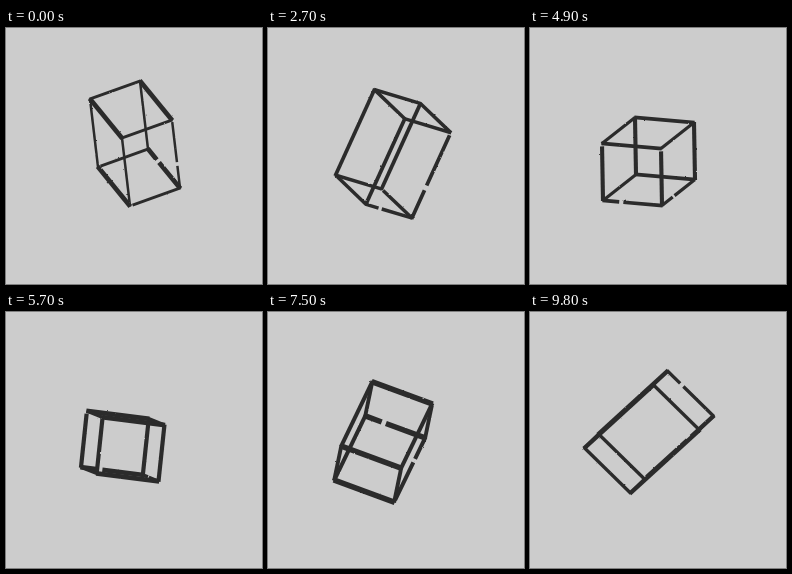
An HTML page without scripts that plays this animation: 256 px wide and 256 px high, repeating every 10000 ms.

```html
<!DOCTYPE html>
<html lang="en">
<head>
<meta charset="utf-8">
<title>Tumbling box</title>
<style>
@property --k { syntax: "<number>"; inherits: true; initial-value: 0 }
@property --w0 { syntax: "<number>"; inherits: true; initial-value: 0 }
@property --w1 { syntax: "<number>"; inherits: true; initial-value: 0 }
@property --w2 { syntax: "<number>"; inherits: true; initial-value: 0 }
@property --w3 { syntax: "<number>"; inherits: true; initial-value: 0 }
@property --w4 { syntax: "<number>"; inherits: true; initial-value: 0 }
@property --w5 { syntax: "<number>"; inherits: true; initial-value: 0 }
@property --w6 { syntax: "<number>"; inherits: true; initial-value: 0 }
@property --w7 { syntax: "<number>"; inherits: true; initial-value: 0 }
@property --w8 { syntax: "<number>"; inherits: true; initial-value: 0 }
@property --ax { syntax: "<number>"; inherits: true; initial-value: 0 }
@property --ay { syntax: "<number>"; inherits: true; initial-value: 0 }
@property --bx { syntax: "<number>"; inherits: true; initial-value: 0 }
@property --by { syntax: "<number>"; inherits: true; initial-value: 0 }
@property --cx { syntax: "<number>"; inherits: true; initial-value: 0 }
@property --cy { syntax: "<number>"; inherits: true; initial-value: 0 }
@property --mx { syntax: "<number>"; inherits: true; initial-value: 0 }
@property --my { syntax: "<number>"; inherits: true; initial-value: 0 }
@property --la { syntax: "<number>"; inherits: true; initial-value: 0 }
@property --lb { syntax: "<number>"; inherits: true; initial-value: 0 }
@property --lc { syntax: "<number>"; inherits: true; initial-value: 0 }

html, body { margin: 0; width: 100%; height: 100%; overflow: hidden; background: #ccc }
html { animation: tick 10s -5ms infinite }

/* step counter: runs of ten steps with a short hold after each */
@keyframes tick {
  0% { --k: 0; animation-timing-function: steps(10) }
  10% { --k: 10; animation-timing-function: step-end }
  12% { --k: 11; animation-timing-function: steps(9) }
  21% { --k: 20; animation-timing-function: step-end }
  23% { --k: 21; animation-timing-function: steps(9) }
  32% { --k: 30; animation-timing-function: step-end }
  34% { --k: 31; animation-timing-function: steps(9) }
  43% { --k: 40; animation-timing-function: step-end }
  45% { --k: 41; animation-timing-function: steps(9) }
  54% { --k: 50; animation-timing-function: step-end }
  56% { --k: 51; animation-timing-function: steps(9) }
  65% { --k: 60; animation-timing-function: step-end }
  67% { --k: 61; animation-timing-function: steps(9) }
  76% { --k: 70; animation-timing-function: step-end }
  78% { --k: 71; animation-timing-function: steps(9) }
  87% { --k: 80; animation-timing-function: step-end }
  89% { --k: 81; animation-timing-function: steps(9) }
  98%, 100% { --k: 90; animation-timing-function: step-end }
}

/* Catmull-Rom weights of nine evenly spaced poses */
svg {
  display: block; width: 100%; height: 100%;
  --u: (var(--k) / 15 + 1);
  --m0: max(var(--u), 0 - var(--u));
  --m1: max(var(--u) - 1, 1 - var(--u));
  --m2: max(var(--u) - 2, 2 - var(--u));
  --m3: max(var(--u) - 3, 3 - var(--u));
  --m4: max(var(--u) - 4, 4 - var(--u));
  --m5: max(var(--u) - 5, 5 - var(--u));
  --m6: max(var(--u) - 6, 6 - var(--u));
  --m7: max(var(--u) - 7, 7 - var(--u));
  --m8: max(var(--u) - 8, 8 - var(--u));
  --w0: calc(pow(max(0, 2 - var(--m0)), 2) * (1 - var(--m0)) / 2 + pow(max(0, 1 - var(--m0)), 2) * (2 * var(--m0) - 1));
  --w1: calc(pow(max(0, 2 - var(--m1)), 2) * (1 - var(--m1)) / 2 + pow(max(0, 1 - var(--m1)), 2) * (2 * var(--m1) - 1));
  --w2: calc(pow(max(0, 2 - var(--m2)), 2) * (1 - var(--m2)) / 2 + pow(max(0, 1 - var(--m2)), 2) * (2 * var(--m2) - 1));
  --w3: calc(pow(max(0, 2 - var(--m3)), 2) * (1 - var(--m3)) / 2 + pow(max(0, 1 - var(--m3)), 2) * (2 * var(--m3) - 1));
  --w4: calc(pow(max(0, 2 - var(--m4)), 2) * (1 - var(--m4)) / 2 + pow(max(0, 1 - var(--m4)), 2) * (2 * var(--m4) - 1));
  --w5: calc(pow(max(0, 2 - var(--m5)), 2) * (1 - var(--m5)) / 2 + pow(max(0, 1 - var(--m5)), 2) * (2 * var(--m5) - 1));
  --w6: calc(pow(max(0, 2 - var(--m6)), 2) * (1 - var(--m6)) / 2 + pow(max(0, 1 - var(--m6)), 2) * (2 * var(--m6) - 1));
  --w7: calc(pow(max(0, 2 - var(--m7)), 2) * (1 - var(--m7)) / 2 + pow(max(0, 1 - var(--m7)), 2) * (2 * var(--m7) - 1));
  --w8: calc(pow(max(0, 2 - var(--m8)), 2) * (1 - var(--m8)) / 2 + pow(max(0, 1 - var(--m8)), 2) * (2 * var(--m8) - 1));
}

/* edge vectors a, b, c, centre m and line weights l */
.box {
  --ax: calc(52 * var(--w0) + 50 * var(--w1) + 44 * var(--w2) + 22.6 * var(--w3) + 1 * var(--w4) - 10 * var(--w5) - 2.5 * var(--w6) + 14 * var(--w7) + 27 * var(--w8));
  --ay: calc(-40 * var(--w0) - 18 * var(--w1) + 7 * var(--w2) + 39 * var(--w3) + 57 * var(--w4) + 49 * var(--w5) + 21.6 * var(--w6) - 14 * var(--w7) - 45 * var(--w8));
  --bx: calc(25 * var(--w0) + 32 * var(--w1) + 39 * var(--w2) + 49.6 * var(--w3) + 59 * var(--w4) + 63 * var(--w5) + 56.5 * var(--w6) + 46 * var(--w7) + 33 * var(--w8));
  --by: calc(52 * var(--w0) + 39 * var(--w1) + 24 * var(--w2) + 9.8 * var(--w3) + 5 * var(--w4) + 13.7 * var(--w5) + 28.3 * var(--w6) + 45 * var(--w7) + 60 * var(--w8));
  --cx: calc(42 * var(--w0) + 8 * var(--w1) - 23 * var(--w2) - 42.9 * var(--w3) - 33 * var(--w4) + 8 * var(--w5) + 44.5 * var(--w6) + 69 * var(--w7) + 85 * var(--w8));
  --cy: calc(30 * var(--w0) + 68 * var(--w1) + 91 * var(--w2) + 76.6 * var(--w3) + 26 * var(--w4) - 41 * var(--w5) - 72 * var(--w6) - 63 * var(--w7) - 45 * var(--w8));
  --mx: calc(130 * var(--w0) + 129 * var(--w1) + 127.5 * var(--w2) + 123.7 * var(--w3) + 118.5 * var(--w4) + 115.4 * var(--w5) + 115.7 * var(--w6) + 119 * var(--w7) + 124 * var(--w8));
  --my: calc(110.5 * var(--w0) + 115.5 * var(--w1) + 120.5 * var(--w2) + 128.4 * var(--w3) + 133.5 * var(--w4) + 133.3 * var(--w5) + 127.2 * var(--w6) + 120 * var(--w7) + 112 * var(--w8));
  --la: calc(3 * var(--w0) + 2.9 * var(--w1) + 2.4 * var(--w2) + 4 * var(--w3) + 4.1 * var(--w4) + 4.2 * var(--w5) + 3.6 * var(--w6) + 3 * var(--w7) + 3 * var(--w8));
  --lb: calc(5 * var(--w0) + 4.7 * var(--w1) + 4.3 * var(--w2) + 3.2 * var(--w3) + 3.7 * var(--w4) + 5.8 * var(--w5) + 5 * var(--w6) + 3.3 * var(--w7) + 3 * var(--w8));
  --lc: calc(2 * var(--w0) + 2.5 * var(--w1) + 3.6 * var(--w2) + 3.7 * var(--w3) + 3.2 * var(--w4) + 4 * var(--w5) + 4 * var(--w6) + 4.2 * var(--w7) + 4 * var(--w8));
  fill: none; stroke: #2b2b2b;
}
.a { --dx: var(--ax); --dy: var(--ay); --px: var(--bx); --py: var(--by); --qx: var(--cx); --qy: var(--cy); --l: var(--la) }
.b { --dx: var(--bx); --dy: var(--by); --px: var(--ax); --py: var(--ay); --qx: var(--cx); --qy: var(--cy); --l: var(--lb) }
.c { --dx: var(--cx); --dy: var(--cy); --px: var(--ax); --py: var(--ay); --qx: var(--bx); --qy: var(--by); --l: var(--lc) }

/* a unit line laid along d, shifted by half of p and q */
path {
  vector-effect: non-scaling-stroke;
  stroke-width: calc(var(--l) * 1px);
  transform: matrix(var(--dx), var(--dy), calc(-1 * var(--dy)), var(--dx),
    calc(var(--mx) + (var(--i) * var(--px) + var(--j) * var(--qx)) / 2),
    calc(var(--my) + (var(--i) * var(--py) + var(--j) * var(--qy)) / 2));
}
.nn { --i: -1; --j: -1 }
.np { --i: -1; --j: 1 }
.pn { --i: 1; --j: -1 }
.pp { --i: 1; --j: 1 }
</style>
</head>
<body>
<svg viewBox="0 0 256 256">
  <filter id="rough" filterUnits="userSpaceOnUse" x="0" y="0" width="256" height="256" color-interpolation-filters="sRGB">
    <feTurbulence type="fractalNoise" baseFrequency=".35" numOctaves="1" seed="4"/>
    <feDisplacementMap in="SourceGraphic" scale="2" xChannelSelector="R" yChannelSelector="G"/>
  </filter>
  <g class="box" filter="url(#rough)">
    <g class="a">
      <path class="nn" d="M-.51 0H.51"/>
      <path class="pn" d="M-.51 0H.51"/>
      <path class="np" d="M-.45 0H.51"/>
      <path class="pp" d="M-.45 0H.51"/>
    </g>
    <g class="b">
      <path class="nn" d="M-.51 0H.51"/>
      <path class="pn" d="M-.51 0H.51"/>
      <path class="np" d="M-.51 0H.51"/>
      <path class="pp" d="M-.51 0H-.225M-.155 0H.51"/>
    </g>
    <g class="c">
      <path class="nn" d="M-.51 0H.51"/>
      <path class="pn" d="M-.51 0H.51"/>
      <path class="np" d="M-.51 0H.51"/>
      <path class="pp" d="M-.47 0H.12M.175 0H.51"/>
    </g>
  </g>
</svg>
</body>
</html>
```
